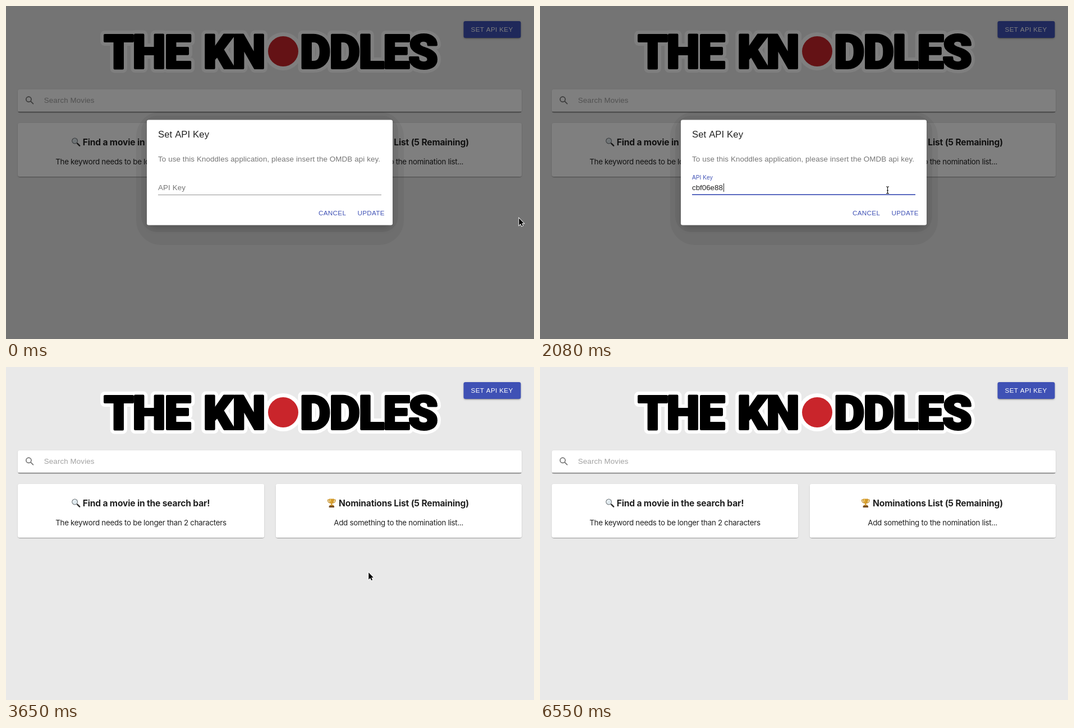
Write an HTML page with a canvas that moves like this. It is 941 px wide and 595 px high and loops after 7.66 s.

```html
<!DOCTYPE html>
<html lang="en">
<head>
<meta charset="utf-8">
<title>The Knoddles</title>
<style>
  html, body { margin: 0; width: 100%; height: 100%; overflow: hidden; background: #e9e9e9; }
  canvas { display: block; }
</style>
</head>
<body>
<canvas id="stage" width="941" height="595"></canvas>
<script>
const W = 941, H = 595, LOOP = 7660;
const ctx = document.getElementById('stage').getContext('2d');

const SANS = '"Liberation Sans", Arial, sans-serif';
const INTER = 'Inter, "Open Sans", sans-serif';
const TITLE = '900 84px Roboto, "Open Sans", sans-serif';
const BLUE = '#3f51b5';
const INK = 'rgba(0,0,0,.87)';
const SOFT = 'rgba(0,0,0,.54)';
const LINE = 'rgba(0,0,0,.42)';

// Moments of the story
const FOCUS = 1420, PASTE = 2080, CLICK = 3410, CLOSED = 3650;

// Pointer: start time, left, top, kind
const pointer = [
  [0, 913, 378, 'arrow'], [200, 898, 377, 'arrow'], [500, 657, 346, 'arrow'],
  [710, 621, 335, 'arrow'], [910, 616, 330, 'arrow'],
  [1420, 613, 319, 'beam'], [1630, 614, 320, 'beam'], [1870, 615, 321, 'beam'],
  [2080, 616, 322, 'beam'], [2290, 641, 348, 'arrow'],
  [2530, 641, 365, 'hand'], [2760, 641, 368, 'hand'],
  [3410, 645, 366, 'arrow'], [5210, 726, 423, 'arrow'], [5510, 733, 429, 'arrow'],
  [5720, 788, 495, 'arrow'], [5920, 818, 515, 'arrow'], [6130, 851, 542, 'arrow'],
  [6340, 905, 591, 'arrow'], [6550, 0, 0, 'none']
];

const shapes = {
  arrow: new Path2D('M1.3 1.2V13.8L4.2 11.1L6.1 15.3L8.1 14.4L6.2 10.3H9.9Z'),
  hand: new Path2D('M4 1.8a1.3 1.3 0 0 1 2.6 0V6.2l.6-.7a1.2 1.2 0 0 1 1.9.5 1.2 1.2 0 0 1 2 .5 ' +
    '1.2 1.2 0 0 1 2 .9V10.5L12 14.3H6L1.2 9.3a1.2 1.2 0 0 1 1.6-1.6L4 8.6Z'),
  beam: new Path2D('M1 .8Q3.5 .8 3.5 2.5V11.5Q3.5 13.2 1 13.2M6 .8Q3.5 .8 3.5 2.5M3.5 11.5Q3.5 13.2 6 13.2M2 7.8H5')
};

function text(str, x, y, size, color, spacing = 0, family = SANS, weight = 400, align = 'left') {
  ctx.font = `${weight} ${size}px ${family}`;
  ctx.letterSpacing = spacing + 'px';
  ctx.textAlign = align;
  ctx.fillStyle = color;
  ctx.fillText(str, x, y);
}

function box(x, y, w, h, r, color) {
  ctx.beginPath();
  ctx.roundRect(x, y, w, h, r);
  ctx.fillStyle = color;
  ctx.fill();
}

function disc(x, y, r, color) {
  ctx.beginPath();
  ctx.arc(x, y, r, 0, Math.PI * 2);
  ctx.fillStyle = color;
  ctx.fill();
}

function stroke(path, width, color) {
  ctx.lineWidth = width;
  ctx.strokeStyle = color;
  ctx.stroke(path);
}

// The caster sits off stage, so only its shadow shows
function shadow(x, y, w, h, dy, blur, spread, alpha) {
  ctx.save();
  ctx.shadowColor = `rgba(0,0,0,${alpha})`;
  ctx.shadowBlur = blur;
  ctx.shadowOffsetX = 3000;
  ctx.shadowOffsetY = dy;
  box(x - spread - 3000, y - spread, w + spread * 2, h + spread * 2, 3.3, '#000');
  ctx.restore();
}

function paper(x, y, w, h) {
  shadow(x, y, w, h, 1.7, 0.8, -0.8, 0.2);
  shadow(x, y, w, h, 0.8, 0.8, 0, 0.14);
  shadow(x, y, w, h, 0.8, 2.5, 0, 0.12);
  box(x, y, w, h, 3.3, '#fff');
}

function title() {
  const words = [['THE', 251], ['KN', 406], ['DDLES', 646]];
  const paint = (width, color) => {
    ctx.lineWidth = width;
    ctx.strokeStyle = ctx.fillStyle = color;
    for (const [word, x] of words) {
      ctx.strokeText(word, x, 111);
      ctx.fillText(word, x, 111);
    }
  };
  ctx.save();
  ctx.font = TITLE;
  ctx.letterSpacing = '-2px';
  ctx.textAlign = 'center';
  ctx.lineJoin = 'round';
  paint(16, '#fff');
  disc(494, 81, 34, '#fff');
  paint(4, '#000');
  disc(494, 81, 27, '#c9252b');
  ctx.restore();
}

function searchIcon() {
  ctx.save();
  ctx.translate(32.5, 158.8);
  ctx.scale(0.833, 0.833);
  stroke(new Path2D('M15 9.5A5.5 5.5 0 1 1 4 9.5A5.5 5.5 0 1 1 15 9.5M13.4 13.4L19.7 19.7'), 2, '#757575');
  ctx.restore();
}

function lens() {
  ctx.save();
  ctx.lineCap = 'round';
  stroke(new Path2D('M127.2 245.6L131.2 249.6'), 2.4, '#2b2b2b');
  disc(122.6, 241, 5.4, '#6d7276');
  disc(122.6, 241, 4.4, '#dfe9ee');
  stroke(new Path2D('M119.8 240.6A3 3 0 0 1 122.2 238.2'), 1, '#fff');
  ctx.restore();
}

function trophy() {
  stroke(new Path2D('M576 237.4H573.6Q573.4 242 577.6 243.2M584.6 237.4H587Q587.2 242 583 243.2'), 1.3, '#c08a22');
  ctx.fillStyle = '#d39a2b';
  ctx.fill(new Path2D('M575.6 235.4H585Q585.2 242.6 581.3 244.4V247H579.3V244.4Q575.4 242.6 575.6 235.4Z'));
  ctx.fillStyle = '#f3cf6b';
  ctx.fill(new Path2D('M577 236.4H579Q578.8 240.4 579.6 242.6Q577 240.6 577 236.4Z'));
  box(576.6, 246.6, 7.4, 1.8, 0.5, '#b37a1c');
  box(575.6, 248.2, 9.4, 2.8, 0.6, '#6b431c');
}

function page() {
  ctx.fillStyle = '#e9e9e9';
  ctx.fillRect(0, 0, W, H);
  title();

  shadow(815.5, 27, 102, 30, 2.5, 0.8, -1.7, 0.2);
  shadow(815.5, 27, 102, 30, 1.7, 1.7, 0, 0.14);
  shadow(815.5, 27, 102, 30, 0.8, 4.2, 0, 0.12);
  box(815.5, 27, 102, 30, 3.3, BLUE);
  text('SET API KEY', 828.6, 46.2, 11.67, '#fff', 0.333);

  paper(21, 149, 898, 40.5);
  ctx.fillStyle = 'rgba(0,0,0,.5)';
  ctx.fillRect(22, 188.8, 896, 1);
  searchIcon();
  text('Search Movies', 67.8, 172.6, 13.33, '#a2a2a2', 0.125);

  paper(21, 209, 439.3, 96);
  paper(480.8, 209, 438.3, 96);
  lens();
  trophy();
  const head = (str, x) => text(str, x, 248.6, 15.6, INK, -0.17, INTER, 700, 'center');
  const note = (str, x) => text(str, x, 283, 13.33, INK, -0.27, INTER, 400, 'center');
  head('Find a movie in the search bar!', 250);
  note('The keyword needs to be longer than 2 characters', 240.5);
  head('Nominations List (5 Remaining)', 709);
  note('Add something to the nomination list...', 699.7);
}

// Stepped shadow around the dialog: left, top, right, bottom, radius
function halo(fading) {
  const bands = fading
    ? [[204, 182, 737, 450, 62], [225, 190, 715, 421, 44], [237, 196, 703, 405, 30]]
    : [[232, 189, 709, 427, 44], [241, 196, 699, 404, 28]];
  ctx.save();
  ctx.beginPath();
  ctx.rect(0, 0, W, H);
  ctx.roundRect(251, 203.5, 438, 188, 3.3);
  ctx.clip('evenodd');
  for (const [l, t, r, b, round] of bands) box(l, t, r - l, b - t, round, 'rgba(0,0,0,.055)');
  shadow(251, 203.5, 438, 188, 9, 12.5, -5.8, 0.22);
  ctx.restore();
}

function ripple() {
  ctx.save();
  ctx.beginPath();
  ctx.roundRect(619.7, 355, 62.6, 30, 3.3);
  ctx.clip();
  ctx.fillStyle = 'rgba(63,81,181,.04)';
  ctx.fillRect(619, 354, 64, 32);
  disc(647, 369.5, 22, 'rgba(63,81,181,.23)');
  ctx.restore();
}

function dialog(t) {
  const fading = t >= CLICK;
  const focused = t >= FOCUS && !fading;
  const filled = t >= PASTE;

  ctx.fillStyle = `rgba(0,0,0,${fading ? 0.45 : 0.5})`;
  ctx.fillRect(0, 0, W, H);
  ctx.save();
  ctx.globalAlpha = fading ? 0.91 : 1;
  halo(fading);
  box(251, 203.5, 438, 188, 3.3, '#fff');
  text('Set API Key', 271, 235.3, 16.67, INK, 0.125);
  text('To use this Knoddles application, please insert the OMDB api key.', 271, 278, 13.33, SOFT, 0.125);

  if (t < FOCUS) text('API Key', 271, 329, 13.33, SOFT, 0.125);
  else text('API Key', 271, 310.2, 10, focused ? BLUE : SOFT, 0.094);
  if (filled) text('cbf06e88', 271, 329, 13.33, INK);

  ctx.fillStyle = focused ? BLUE : LINE;
  ctx.fillRect(271, focused ? 336.2 : 337, 398, focused ? 1.7 : 1);

  const caret = focused && (t < 1630 || (t >= PASTE && t < 2530) || t >= 3180);
  if (caret) {
    ctx.fillStyle = '#222';
    ctx.fillRect(filled ? 327 : 271, 317, 1, 15);
  }

  if (fading) ripple();
  text('CANCEL', 557, 374.2, 11.67, BLUE, 0.333);
  text('UPDATE', 626.5, 374.2, 11.67, BLUE, 0.333);
  ctx.restore();
}

function drawPointer(t) {
  const [, x, y, kind] = pointer.findLast(step => step[0] <= t);
  const shape = shapes[kind];
  if (!shape) return;
  ctx.save();
  ctx.translate(x, y);
  if (kind === 'beam') {
    stroke(shape, 2.4, 'rgba(255,255,255,.8)');
    stroke(shape, 1.1, '#111');
  } else if (kind === 'hand') {
    ctx.fillStyle = '#fff';
    ctx.fill(shape);
    stroke(shape, 1, '#000');
  } else {
    stroke(shape, 1.8, '#fff');
    ctx.fillStyle = '#000';
    ctx.fill(shape);
  }
  ctx.restore();
}

function frame(now) {
  const t = now % LOOP;
  page();
  if (t < CLOSED) dialog(t);
  drawPointer(t);
  requestAnimationFrame(frame);
}
requestAnimationFrame(frame);
</script>
</body>
</html>
```
